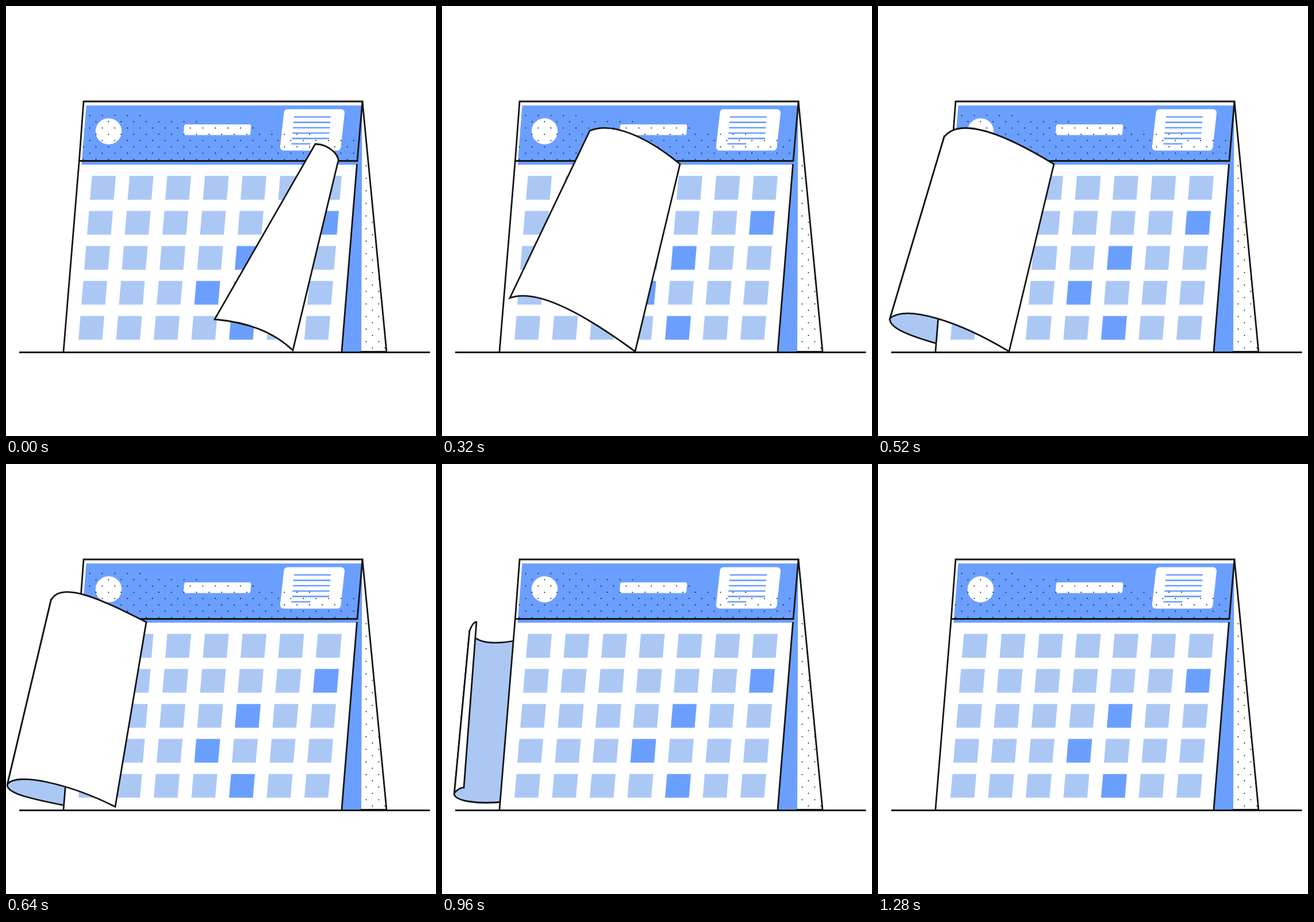
Recreate the animation shown at these times as an HTML page. Size 748 by 748 pixels, loop 1920 ms.

```html
<!DOCTYPE html>
<html lang="en">
<head>
<meta charset="utf-8">
<title>Calendar page turn</title>
<style>
html, body { margin: 0; width: 100%; height: 100%; overflow: hidden; background: #fff; }
svg { display: block; width: 100vw; height: 100vh; }
.line { fill: none; stroke: #151515; stroke-width: 2.8; }
.paper { fill: #fff; }
.blue { fill: #6b9fff; }
.light { fill: #abc8f5; }
.soft { fill: #fff; stroke: #fff; stroke-linejoin: round; }
</style>
</head>
<body>
<svg viewBox="0 0 748 748">
  <path id="back" class="line" style="fill:#abc8f5"/>
  <path id="strip" class="line" style="fill:#fff"/>
  <path class="paper" d="M620 166L662 601H617Z"/>
  <path class="paper" d="M135 166H620L584 601H100Z"/>
  <path class="blue" d="M139.500 173H619.500L618 601H584L610.500 276H131.500Z"/>
  <circle class="paper" cx="178.500" cy="218" r="22.700"/>
  <path class="soft" stroke-width="6" d="M313 209H423.200L422.200 221.600H312Z"/>
  <path class="soft" stroke-width="12" d="M489.500 185.500H583L576.500 245.500H482.800Z"/>
  <g id="notes" stroke="#6b9fff" stroke-width="2.6"></g>
  <g id="days"></g>
  <g id="dots" fill="#151515"></g>
  <path class="line" d="M135 166H620L611 269.500H127.300Z"/>
  <path class="line" d="M127.300 269L100 601M610.500 275L584 601M620 166L662 601.300H617"/>
  <path class="line" d="M23 602.500H737.500"/>
  <path id="flap" class="line" style="fill:#fff"/>
</svg>
<script>
const $ = id => document.getElementById(id);
const LOOP = 1920, STEP = 40;
const LIFT = 520, WRAP = 760, TUCK = 960, GONE = 1280;

// time, outer top corner x y, fold x, outer bottom corner x y
const poses = [
  [0,    538, 240,   577, 363, 545],
  [160,  420, 225.5, 510, 256, 527],
  [320,  257, 217,   414, 118, 508],
  [LIFT, 115, 228,   306, 21, 543],
  [640,  78, 238,    244, 2.5, 557],
  [WRAP, 55, 260,    159, 5, 566],
  [TUCK, 48, 290,    60, 21.5, 572]
];

const clamp = n => Math.max(0, Math.min(1, n));
const mix = (a, b, u) => a + (b - a) * u;
const list = nums => nums.map(n => n.toFixed(2)).join(' ');

function slope(i, k) {
  const last = poses.length - 1;
  const rate = (a, b) => (poses[b][k] - poses[a][k]) / (poses[b][0] - poses[a][0]);
  if (i === 0) return 2 * rate(0, 1) - rate(0, 2);
  if (i === last) return 2 * rate(last - 1, last) - rate(last - 2, last);
  return rate(i - 1, i + 1);
}

// smooth cubic through the poses
function pose(t) {
  let i = 0;
  while (i < poses.length - 2 && t >= poses[i + 1][0]) i++;
  const a = poses[i], b = poses[i + 1], span = b[0] - a[0];
  const u = (t - a[0]) / span, v = 1 - u;
  return a.slice(1).map((p, j) => {
    const k = j + 1;
    return p * (1 + 2 * u) * v * v + b[k] * u * u * (3 - 2 * u)
      + span * u * v * (v * slope(i, k) - u * slope(i + 1, k));
  });
}

function pageAt(t) {
  const open = Math.min(t, TUCK), late = Math.max(0, t - TUCK);
  const [ax, ay, foldX, cx, cy] = pose(open);
  const drift = late * (0.181 + 0.000234 * late);
  const sag = late * 0.025, thin = clamp(late / 160);

  // the fold swings upright and rises once the page leaves the sheet
  const lean = -78 + 56 * clamp((open - LIFT) / 280);
  const tall = 326 - 38 * clamp((open - LIFT) / (TUCK - LIFT)) ** 1.6;
  const foldY = 275 - 2 * clamp(1 - open / 160);

  return {
    f: open / WRAP,
    a: [ax + drift, ay + sag],
    b: [mix(foldX, ax, thin) + drift, mix(foldY, ay, thin) + sag],
    c: [cx + drift, cy],
    d: [mix(foldX + lean, cx, thin) + drift, mix(foldY + tall, cy, thin)]
  };
}

// handles of a page edge: [near the outer corner, near the fold]
function handles(p, q, f, run, rise, slack) {
  const wide = q[0] - p[0], start = (1 - f) ** 4;
  const out = Math.min(Math.max(run, 2), wide * 0.7);
  const back = wide * (0.43 - slack * start);
  const drop = wide * (0.43 - 0.12 * start) * (0.8 - 0.42 * f * f);
  return [[p[0] + out, p[1] - rise], [q[0] - back, q[1] - drop]];
}

function frontPath({ f, a, b, c, d }) {
  const topRise = 40 * Math.sin(Math.PI * 0.65 * f) ** 3 - 1;
  const lowRise = 28 * Math.sin(Math.PI * 0.73 * f) - 5;
  const [t1, t2] = handles(a, b, f, 42 * (1 - f ** 3), topRise, 0.58);
  const [l1, l2] = handles(c, d, f, 55 * (1 - f ** 2), lowRise, 0.17);
  return `M${list(a)}C${list([...t1, ...t2, ...b])}L${list(d)}C${list([...l2, ...l1, ...c])}Z`;
}

// the far side of the page, its right end hidden by the calendar
function backPath({ a, c }, t) {
  const u = clamp((t - LIFT) / (TUCK - LIFT));
  const low = 587 + 9 * Math.sin(Math.PI * u), hang = 14 - 17 * u * u;
  const top = [a[0] + 10, a[1] + 25, (a[0] + 132) / 2 + 5, 314, 134, 306];
  const curl = [mix(c[0], 112, 0.45), low - hang + 3, c[0] - 4, c[1] + 18 - 4 * u, ...c];
  return `M${list(a)}C${list(top)}L${list([112, low + 3 * (1 - u)])}C${list(curl)}Z`;
}

function draw(now) {
  const t = Math.floor((now % LOOP) / STEP) * STEP;
  const page = pageAt(t), shown = t < GONE;
  const front = shown ? frontPath(page) : '';
  const wrapped = shown && (t > TUCK || page.c[0] < 103);
  $('back').setAttribute('d', wrapped ? backPath(page, t) : '');
  $('strip').setAttribute('d', t > TUCK ? front : '');
  $('flap').setAttribute('d', t > TUCK ? '' : front);
}

function buildDays() {
  const marked = ['1,6', '2,4', '3,3', '4,4'];
  let out = '';
  for (let r = 0; r < 5; r++) {
    for (let c = 0; c < 7; c++) {
      const x = 149.5 + 65.5 * c - 5 * r, y = 295.6 + 60.9 * r;
      const tone = marked.includes(`${r},${c}`) ? 'blue' : 'light';
      out += `<path class="${tone}" d="M${x} ${y}h41.500l-3.500 41.300h-41.500Z"/>`;
    }
  }
  $('days').innerHTML = out;
}

function buildNotes() {
  let out = '';
  for (let i = 0; i < 6; i++) {
    const x = 500.8 - 0.85 * i, end = i < 5 ? 565 - 0.75 * i : 529.5;
    out += `<path d="M${x} ${193 + 9.35 * i}H${end}"/>`;
  }
  $('notes').innerHTML = out;
}

function buildDots() {
  const gap = 10.93;
  let out = '';
  for (let r = 0; r < 38; r++) {
    const y = 190.4 + gap * r;
    for (let c = -1; c < 48; c++) {
      if ((r + c) % 2) continue;
      const x = 145.6 + gap * c;
      const left = 139.5 - (y - 173) * 0.078;
      const right = Math.min(240 + 100 * r, 617 - (y - 166) * 0.087);
      const inHead = r < 8 && x > left && x < right;
      const inLeg = r > 7 && x > 621 && x < 619 + (y - 166) * 0.0966;
      if (inHead || inLeg) out += `<circle cx="${x.toFixed(2)}" cy="${y.toFixed(2)}" r="1"/>`;
    }
  }
  $('dots').innerHTML = out;
}

function tick() {
  draw(performance.now());
  requestAnimationFrame(tick);
}

buildDays();
buildNotes();
buildDots();
draw(0);
requestAnimationFrame(tick);
</script>
</body>
</html>
```
